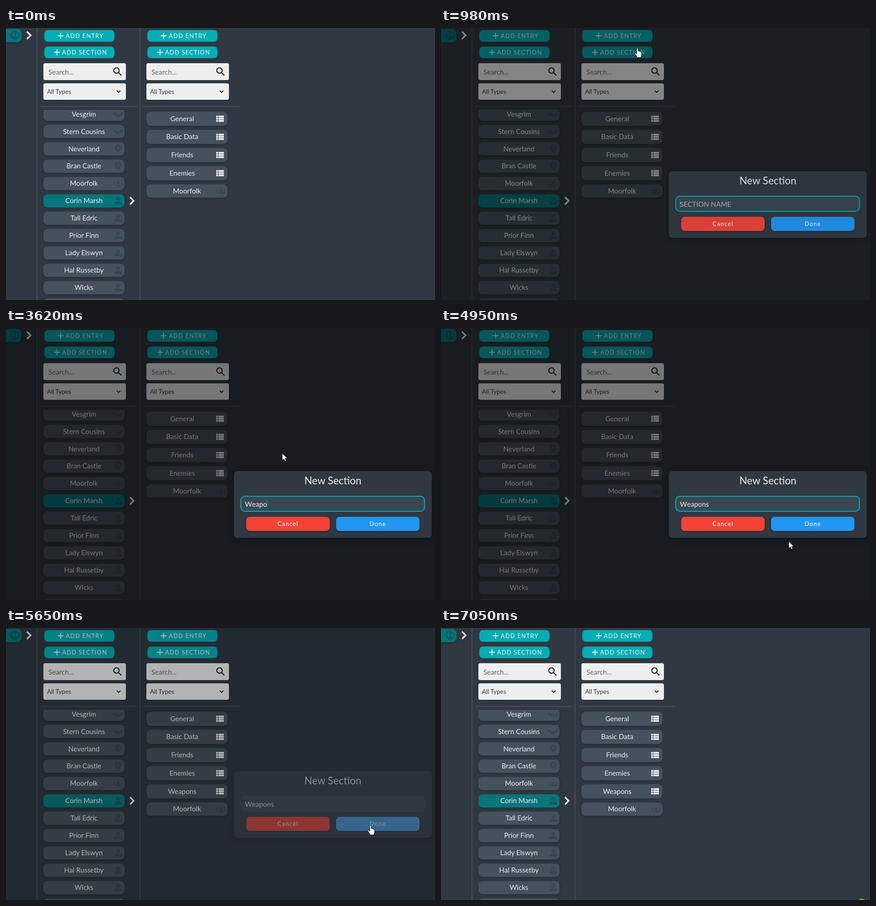
Animation of 941 by 595 pixels, one loop 7130 ms. Source, as an HTML page:

```html
<!DOCTYPE html>
<html lang="en">
<head>
<meta charset="utf-8">
<title>New section</title>
<style>
  html, body { margin: 0; width: 100%; height: 100%; overflow: hidden; background: #303841; }
  body, text { font-family: Lato, "Open Sans", sans-serif; font-size: 15.2px; }
  svg, .veil { position: absolute; left: 0; top: 0; width: 941px; height: 595px; }
  text { fill: #eee; }
  .mid { text-anchor: middle; }
  .add { font-size: 13px; font-weight: 500; letter-spacing: 1.1px; }
  .hint { fill: #62666b; }
  .type { font-size: 13.5px; fill: #303841; }
  .rule { fill: #454e58; }
  .teal { fill: #00adb5; }
  .paper { fill: #eee; }
  .row { filter: drop-shadow(0 2px 2px rgba(0, 0, 0, .22)); }
  .row .box { fill: #45515c; }
  .row .icon { fill: #3a4750; }
  .row.on .box { fill: #06757a; }
  .row.on .icon { fill: #055f65; }
  .line { fill: none; stroke: #eee; }
  .dark { stroke: #24292f; }
  .veil { background: #000; opacity: 0; }

  .dialog { position: absolute; left: 500px; top: 313px; width: 434px; height: 146px; border-radius: 8px;
    background: #303841; color: #eee; box-shadow: 0 4px 14px rgba(0, 0, 0, .35); opacity: 0; }
  .dialog > * { position: absolute; box-sizing: border-box; }
  .title { left: 0; right: 0; top: 6px; line-height: 30px; font-size: 22.4px; text-align: center; }
  .field { left: 14px; top: 54px; width: 405px; height: 35px; border: 2px solid #00adb5; border-radius: 10px;
    background: #3a4750; display: flex; align-items: center; padding-left: 8px; }
  .ghost { position: absolute; left: 8px; color: #b3b8bc; }
  .field b { font-weight: 400; font-size: 0; }
  .caret { width: 1px; height: 17px; background: #00adb5; visibility: hidden; }
  .btn { top: 100px; width: 183px; height: 31px; border-radius: 8px; line-height: 31px; font-size: 13px;
    font-weight: 600; letter-spacing: 1.2px; text-align: center; box-shadow: 0 2px 3px rgba(0, 0, 0, .25); }
  .cancel { left: 27px; background: #f44336; }
  .done { left: 224px; background: #2196f3; }
  .pointer path { fill: #fff; stroke: #15181b; stroke-linejoin: round; }
</style>
</head>
<body>
<svg id="page" viewBox="0 0 941 595">
  <clipPath id="list"><path d="M0 179H941V595H0Z"/></clipPath>
</svg>
<div class="veil"></div>
<div class="dialog">
  <div class="title">New Section</div>
  <div class="field"><span class="ghost">SECTION NAME</span><i class="caret"></i></div>
  <div class="btn cancel">Cancel</div>
  <div class="btn done">Done</div>
</div>
<svg viewBox="0 0 941 595">
  <circle class="spot" cx="923" cy="602" r="10" fill="#a09c1c"/>
  <g class="pointer"><g class="mover">
    <path class="arrow" d="M0 0V15.5L3.6 12.2L6 17.6L8.6 16.4L6.2 11.2H11Z"/>
    <path class="hand" d="M-1.6 1.2Q-1.6 -.4 0 -.4Q1.6 -.4 1.6 1.2V6.6Q3.2 5.6 4.3 7.2Q6 6.6 6.9 8.4Q8.8 8.2 9 10V15
      Q8.6 18 7.5 20.4H-1Q-1.5 18 -3.4 15.6L-5.8 12Q-6.3 10 -4.4 10.2L-1.6 12.6Z"/>
  </g></g>
</svg>
<script>
const LOOP = 7130;
const OPEN = 760, CLICK = 5420, CLOSE = 5500, CLOSED = 5730;

// ---- drawing ----
const rect = (x, y, w, h, rx, cls) =>
  `<rect x="${x}" y="${y}" width="${w}" height="${h}" rx="${rx}" class="${cls}"/>`;
const text = (x, y, str, cls) => `<text x="${x}" y="${y}" class="${cls}">${str}</text>`;
const line = (d, width, cls = '') => `<path class="line ${cls}" d="${d}" stroke-width="${width}"/>`;
const at = (x, y, body, scale = 1) => `<g transform="translate(${x} ${y}) scale(${scale})">${body}</g>`;
const chevron = (x, y) => line(`M${x - 4} ${y - 8}l8 8l-8 8`, 3.4);

const person = '<circle cy="-4.2" r="4.3"/><path d="M-8.5 8V6Q-8.5 1.5 0 1.5Q8.5 1.5 8.5 6V8Z"/>';
const icons = {
  person,
  group: at(-8.5, .5, person, .42) + at(8.5, .5, person, .42) + at(0, 1, person, .66),
  pin: '<path fill-rule="evenodd" d="M0 10C-3 5-7 2-7-3A7 7 0 0 1 7-3C7 2 3 5 0 10ZM0-5.5a2.5 2.5 0 1 0 .1 0Z"/>',
  shake: '<path d="M-11-4L-6-2Q0 4 6-2L11-4V0L6 3Q0 8-6 3L-11 0Z"/>',
  globe: '<circle r="9.8"/><path fill="#06757a" d="M-7-3l4-4l3 1l-2 4l2 3l-2 5l-3-5ZM3-7l4 4l1 5l-3 3l-3-5Z"/>',
};
const icon = (name, x, y) => at(x, y, `<g class="icon">${icons[name]}</g>`);
const bars = [-1, 0, 1].map(i =>
  rect(461, 4.8 * i - 2, 3.8, 3.8, 0, 'paper') + rect(465.8, 4.8 * i - 2, 12.2, 3.8, 0, 'paper')).join('');

const row = (x, cy, h, label, mark, cls = '', tx = x + 89) =>
  `<g class="row ${cls}">${rect(x, cy - h / 2, 178, h, 9, 'box')}${mark}${text(tx, cy + 5.2, label, 'mid')}</g>`;
const entry = (x, cy, label, kind, cls, tx) => row(x, cy, 29, label, icon(kind, x + 164, cy), cls, tx);
const section = (label, i, cls) => {
  const cy = 198.5 + 39.7 * i;
  return row(308, cy, 31, label, at(0, cy, bars), cls, 386.5);
};

const addButton = (y, x, label, cls = '') =>
  rect(84, y, 154, 25.5, 8, 'teal ' + cls) +
  line(`M${x} ${y + 12.5}h13m-6.5 -6.5v13`, 2) +
  text(x + 17.8, y + 17.2, label, 'add');

const column = (x, cls) => at(x, 0,
  rect(67, 0, 2, 595, 0, 'rule') +
  addButton(4.5, 113.3, 'ADD ENTRY') +
  addButton(40.5, 105.3, 'ADD SECTION', cls) +
  rect(82, 77, 181, 37, 4, 'paper') +
  text(93, 101.5, 'Search...', 'hint') +
  line('M248.2 93a5.9 5.9 0 1 0 -11.8 0a5.9 5.9 0 1 0 11.8 0M246.6 97.3l6.4 6.4', 2.4, 'dark') +
  rect(82, 121, 181, 36, 4, 'paper') +
  text(90, 144, 'All Types', 'type') +
  line('M243 137l4 4l4 -4', 1.8, 'dark') +
  rect(75, 170.5, 212, 2, 0, 'rule'));

const kinds = { shake: 'Vesgrim,Stern Cousins', pin: 'Neverland,Bran Castle', group: 'Moorfolk',
  person: 'Corin Marsh,Tall Edric,Prior Finn,Lady Elswyn,Hal Russetby,Wicks,' };
const entries = Object.entries(kinds).flatMap(([kind, names]) => names.split(',').map(name => [name, kind]));

document.getElementById('page').insertAdjacentHTML('beforeend',
  `<g class="row on">${rect(-30, 2, 64, 29, 9, 'box')}${icon('globe', 19.5, 16)}</g>` +
  chevron(50, 16) + column(0) + column(226, 'hot') +
  `<g clip-path="url(#list)">${entries.map(([name, kind], i) =>
    entry(82, 188.4 + 37.95 * i, name, kind, name === 'Corin Marsh' ? 'on' : '')).join('')}</g>` +
  chevron(276, 378) +
  ['General', 'Basic Data', 'Friends', 'Enemies'].map((name, i) => section(name, i)).join('') +
  section('Weapons', 4, 'new') +
  entry(308, 356.5, 'Moorfolk', 'group', 'last', 397));

// ---- motion: keyframes written in milliseconds ----
const sheet = document.head.appendChild(document.createElement('style'));
let count = 0;

function track(selector, frames, timing = 'linear') {
  const name = 'k' + count++;
  const steps = frames.map(([ms, css]) => `${(ms / LOOP * 100).toFixed(4)}% {${css}}`);
  sheet.textContent += `@keyframes ${name} {${steps.join(' ')}}
    ${selector} {animation: ${name} ${LOOP}ms ${timing} infinite}\n`;
}

// Hard switches between two styles at the given times.
const toggle = (selector, off, on, ...times) =>
  track(selector, [0, ...times].map((ms, i) => [ms, i % 2 ? on : off]).concat([[LOOP, off]]), 'step-end');
const show = (selector, ...times) => toggle(selector, 'visibility:hidden', 'visibility:visible', ...times);

const fade = (selector, max) => track(selector, [
  [0, 'opacity:0'], [OPEN, 'opacity:0;animation-timing-function:ease-out'], [OPEN + 300, `opacity:${max}`],
  [CLOSE, `opacity:${max};animation-timing-function:ease-in`], [CLOSED, 'opacity:0'], [LOOP, 'opacity:0']]);
fade('.veil', .5);
fade('.dialog', 1);

// Each leg: start, end, and the point reached.
const legs = [[70, 660, 431, 44], [1000, 1450, 606, 274], [4320, 4480, 626, 278],
  [4560, 4860, 740, 488], [4870, 5190, 799.5, 432], [5970, 6580, 909, 600]];
const place = (x, y) => `transform:translate(${x}px,${y}px)`;
let here = place(851, 557);
const route = [[0, here]];
for (const [start, end, x, y] of legs) {
  route.push([start, here + ';animation-timing-function:ease-out']);
  route.push([end, here = place(x, y)]);
}
track('.mover', [...route, [LOOP, here]]);
toggle('.pointer', 'opacity:0', 'opacity:1', 70, 6580);
const overButton = [590, 1060, 5030, 6050];
toggle('.arrow', 'opacity:1', 'opacity:0', ...overButton);
toggle('.hand', 'opacity:0', 'opacity:1', ...overButton);

toggle('.hot', 'fill:#00adb5', 'fill:#00a1a9', 590, 1060);
toggle('.done', 'background:#2196f3', 'background:#47a0ea', CLICK, CLOSED);
toggle('.field', 'border-color:#00adb5', 'border-color:#3a4750', CLICK, CLOSED);
toggle('.last', 'transform:none', 'transform:translateY(39.8px)', CLOSE);
show('.new', CLOSE);
show('.spot', 7050);

const TYPE = 2610, KEY = 235, BLINK = 545, SHOWN = 830, IDLE = 4480;
toggle('.ghost', 'visibility:visible', 'visibility:hidden', TYPE, CLOSED);
show('.caret', ...[0, 1, 2, 3].map(i => SHOWN + BLINK * i), TYPE, IDLE, IDLE + BLINK, CLICK);

const caret = document.querySelector('.caret');
[...'Weapons'].forEach((char, i) => {
  const letter = document.createElement('b');
  letter.id = 'key' + i;
  letter.textContent = char;
  caret.before(letter);
  toggle('#key' + i, 'font-size:0', 'font-size:15.2px', TYPE + KEY * i, CLOSED);
});
</script>
</body>
</html>
```
